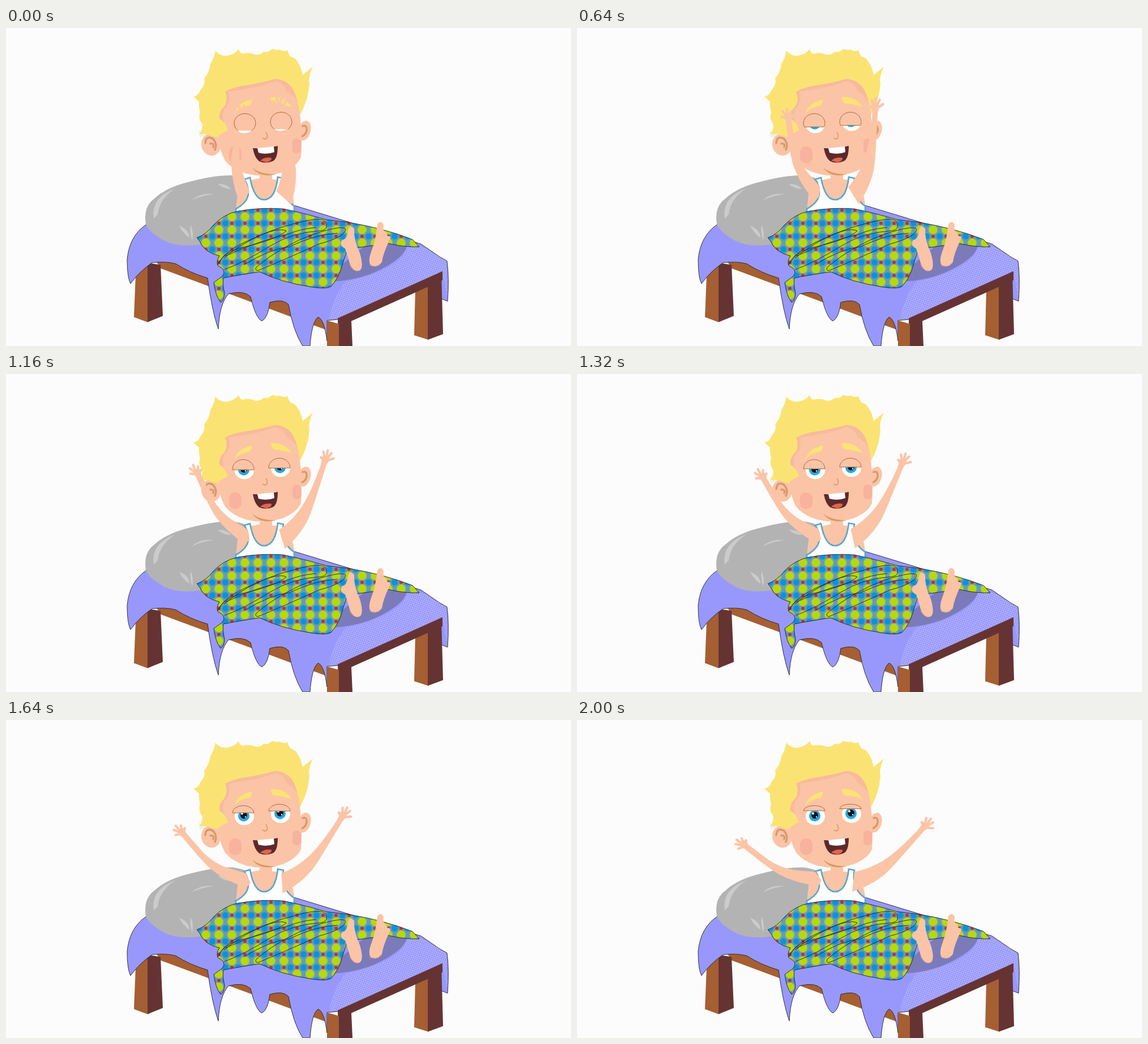
These frames come from a looping animation (998 by 561 pixels, 2.04 s). An HTML page:

```html
<!DOCTYPE html>
<html lang="en">
<head>
<meta charset="utf-8">
<title>Waking up</title>
<style>
html, body { margin: 0; width: 100%; height: 100%; overflow: hidden; background: #fcfcfc }
svg { display: block; width: 100vw; height: 100vh }
.skin { fill: #fbc4a6 }
.hair { fill: #fbe373 }
.light { fill: #a55f32 }
.dark { fill: #633 }
.sheet { fill: #9898fc }
.ink { stroke: #222; stroke-width: .9 }
.fold { fill: none }
.finger { fill: none; stroke: #fbc4a6; stroke-width: 4.2; stroke-linecap: round }
.ear { fill: none; stroke: #d69a6c; stroke-width: 3.4; stroke-linecap: round }
.lid { fill: #fbc4a6; stroke: #a9683f; stroke-width: 1 }
.blush { fill: #f8b29d }
</style>
</head>
<body>
<svg viewBox="0 0 998 561">
<defs>
  <pattern id="dots" x="410.5" y="321.5" width="23" height="23" patternUnits="userSpaceOnUse">
    <rect width="23" height="23" fill="#629bc0"/>
    <circle cx="11.5" cy="11.5" r="7.9" fill="#b7d80b"/>
    <g fill="#0a93d8"><circle r="5.5"/><circle cx="23" r="5.5"/><circle cy="23" r="5.5"/><circle cx="23" cy="23" r="5.5"/></g>
    <g fill="#d3252c"><circle cx="11.5" r="3"/><circle cx="11.5" cy="23" r="3"/></g>
  </pattern>
  <pattern id="specks" width="5" height="5" patternUnits="userSpaceOnUse" patternTransform="rotate(-24)">
    <circle cx="1" cy="1" r=".7" fill="#f2f2ff"/><circle cx="3.5" cy="3.5" r=".7" fill="#f2f2ff"/>
  </pattern>
</defs>

<!-- bed -->
<path class="light" d="M258 400 567 500V533L273 424zM229 436 250 414V519L226 510z"/>
<path class="dark" d="M250 414 273 418 277 508 250 519z"/>
<path class="sheet ink" d="M247 347Q218 367 214 408Q214 440 220 451Q235 430 258 414Q282 411 300 416Q325 432 356 441Q364 500 375 531Q377 487 393 469Q420 462 432 474Q441 512 452 517Q463 511 466 484Q490 477 499 488Q507 534 524 561H537Q540 519 551 510Q562 513 567 552V516L587 514 745 444V462L770 478 780 482Q783 440 779 411L765 403 733 381 509 313 400 290z"/>
<path fill="url(#specks)" d="M600 447Q660 435 690 412Q708 398 709 383L735 385 778 411 780 478 771 432 587 512 570 515Q580 470 600 447z"/>
<path fill="#7b7bb9" d="M580 447Q632 444 671 421Q705 402 708 384Q690 376 640 379L590 420z"/>
<path class="light" d="M723 462 746 452V550L721 542z"/>
<path class="dark" d="M745 442 769 432 772 540 745 550zM586 512 771 429V445L610 517 612 561H587z"/>
<path class="light" d="M567 516 588 522V561H567z"/>

<!-- pillow -->
<path fill="#b3b3b3" d="M247 346Q242 315 262 301Q283 281 325 271Q370 259 400 260Q420 262 428 270L440 320 342 382Q304 387 281 376Q252 360 247 346z"/>
<path fill="#cbcbcb" d="M261 336Q255 299 299 283Q271 301 268 329zM328 304Q342 290 367 293Q344 296 328 304zM374 275Q384 284 398 284Q389 274 374 275zM306 349Q324 356 324 370Q313 363 306 349zM326 347Q332 360 329 375Q324 360 326 347zM334 373Q342 366 350 369Z"/>

<!-- body -->
<path class="skin" d="M424 270 448 265V250H470V267L490 269Q509 287 509 318L406 320 410 284z"/>
<path fill="#fff" stroke="#5ba6cb" stroke-width="2.6" d="M421 267 431 264Q438 303 456 303Q476 302 480 263L490 265Q484 297 509 314V332H406V319Q428 307 428 291Q428 277 421 267z"/>

<!-- head -->
<path fill="#efefed" d="M340 180 342 193 352 191z"/>
<path class="hair" d="M342 187Q349 175 346 168Q339 160 343 149Q340 139 341 130L331 121Q341 119 343 110Q353 99 350 89Q360 77 361 63Q367 55 370 40Q378 50 390 49Q405 46 411 37Q413 47 420 45Q431 42 440 47Q450 48 455 42Q464 44 470 37Q478 40 484 38Q491 43 497 39Q499 46 502 50Q512 53 515 60Q521 68 524 83L542 68Q533 87 536 99Q534 127 520 152L450 190 378 196 362 188Z"/>
<ellipse class="skin" cx="362" cy="206" rx="17" ry="19.5" transform="rotate(-16 362 206)"/>
<ellipse class="skin" cx="527" cy="181" rx="11" ry="18" transform="rotate(16 527 181)"/>
<path class="ear" d="M352 203Q353 189 365 195Q374 204 369 215M361 204Q368 203 366 210M524 173Q532 170 531 181Q529 189 523 191"/>
<path class="skin" d="M387 112Q401 105 418 102Q447 98 475 90Q499 91 509 112Q516 127 519 151Q524 190 521 228Q515 243 490 254Q456 265 425 257Q400 250 387 234Q376 214 375 190L392 180Q386 169 377 160Q375 148 386 138Q393 125 387 112z"/>
<path fill="#f7bb9b" d="M387 112Q401 105 418 102Q447 98 475 90Q499 91 509 112L515 128Q505 117 496 112Q489 95 474 94Q450 105 393 112Q398 127 389 140Q380 148 385 165L377 160Q375 148 386 138Q393 125 387 112z"/>
<path class="hair" d="M360 160 377 160Q388 167 392 180Q385 185 381 181Q378 193 369 192L355 187z"/>
<rect class="blush" x="394" y="209" width="22" height="29" rx="10"/>
<rect class="blush" x="506" y="195" width="15" height="26" rx="7"/>
<path class="hair" d="M403 151Q410 131 434 126Q436 131 430 137Q414 139 403 151zM468 122Q491 119 505 140Q489 134 473 133Q467 128 468 122z"/>
<path fill="none" stroke="#d99a68" stroke-width="1.6" d="M459 184Q465 194 457 196L453 194"/>
<path fill="#d99a62" d="M435 246Q447 258 477 258Q447 265 435 246z"/>
<path fill="#5c292c" d="M436 212Q459 213 480 208Q480 231 471 235Q458 240 447 235Q439 229 436 212z"/>
<path fill="#fff" d="M444 212 473 209 474 219Q460 224 446 220z"/>
<path fill="#e2644f" d="M449 234Q457 227 469 229Q470 235 460 237z"/>

<!-- arms -->
<g id="armL">
  <path class="skin" d="M303 220 340 248Q363 262 385 265L421 268 432 283 427 292 409 290Q382 285 358 273Q343 265 298 229L289 222Q288 214 296 212z"/>
  <path class="finger" d="M295 220 291 209M293 220 282 211M292 221 280 219M295 223 285 227M298 220 299 212"/>
</g>
<g id="armR">
  <path class="skin" d="M603 193Q558 241 530 254Q513 263 490 268L486 303 509 294Q530 284 544 272Q557 260 575 239L612 197 622 189Q620 178 612 180z"/>
  <path class="finger" d="M614 187 617 173M616 187 625 174M617 187 629 181M616 190 629 191M611 188 609 180"/>
</g>

<g id="eyes"></g>

<!-- blanket and feet -->
<path class="ink" fill="url(#dots)" d="M337 370Q354 364 366 348Q385 328 410 323Q450 316 490 319Q524 326 565 338L606 343Q670 354 718 373L730 386Q704 387 675 380L603 390 594 418Q588 441 574 456Q566 461 540 457Q483 448 448 430Q410 436 384 441Q382 450 386 468Q385 482 379 484Q370 472 367 449L382 438Q391 427 374 419Q371 411 377 402Q350 396 342 376z"/>
<path class="fold ink" d="M374 418Q384 393 435 372Q481 350 495 358Q479 373 418 387Q382 397 376 416M385 406Q434 364 510 345Q560 331 565 343Q571 357 552 358Q505 361 466 385Q421 413 386 426M388 402Q450 374 494 365Q520 354 548 352M443 421Q487 384 545 363Q596 347 600 355Q598 369 553 381Q489 410 445 428Q438 427 443 421M420 418Q465 390 500 386Q550 363 586 362"/>
<path class="skin" d="M604 356Q607 346 615 354Q614 374 625 397Q633 424 624 428Q614 432 607 415Q603 400 599 389Q587 383 594 374Q603 373 604 356zM656 346Q662 338 667 347Q665 359 672 361L674 367Q682 366 677 375Q666 398 664 413Q657 424 644 419Q639 411 645 395Q653 375 656 346z"/>
<path fill="none" stroke="#eda488" d="M607 417Q613 431 624 428M643 416Q652 425 662 415"/>
</svg>
<script>
const $ = id => document.getElementById(id);
const eyes = [
  { x: 420, y: 170, top: 151, from: 181, to: 160 },
  { x: 484, y: 166, top: 148.5, from: 178.5, to: 156.5 },
];

$('eyes').innerHTML = eyes.map(({ x, y }) => `
  <ellipse cx="${x + 1}" cy="${y}" rx="17" ry="15.5" fill="#fff"/>
  <circle cx="${x}" cy="${y - 1}" r="10" fill="#27a8e2"/>
  <circle cx="${x}" cy="${y - 2}" r="6" fill="#10151b"/>
  <circle cx="${x - 3}" cy="${y - 5}" r="2" fill="#fff"/>
  <circle cx="${x + 3}" cy="${y + 1}" r="1.2" fill="#fff"/>
  <path class="lid"/>`).join('');
const lids = document.querySelectorAll('.lid');

// The lid is an ellipse cut off at the height the eye has opened to; it flattens as it rises.
function lidPath({ x, top, from, to }, s) {
  const cut = from + (to - from) * s;
  const cx = x - 1 + 3 * Math.max(0, 1 - s * 5);
  const ry = Math.min(17, cut - top);
  const w = 19 * Math.sqrt(Math.max(0, 1 - ((cut - top) / ry - 1) ** 2));
  return `M${cx - w} ${cut}A19 ${ry} 0 ${+(cut > top + ry)} 1 ${cx + w} ${cut}${s > .08 ? 'z' : ''}`;
}

function draw() {
  const step = Math.floor(performance.now() % 2040 / 40);
  const s = Math.max(0, step - 1) / 49;
  $('armL').setAttribute('transform', `rotate(${64 * (1 - s)} 410 285)`);
  $('armR').setAttribute('transform', `rotate(${-55 * (1 - s)} 503 290)`);
  eyes.forEach((eye, i) => lids[i].setAttribute('d', lidPath(eye, s)));
  requestAnimationFrame(draw);
}
draw();
</script>
</body>
</html>
```
